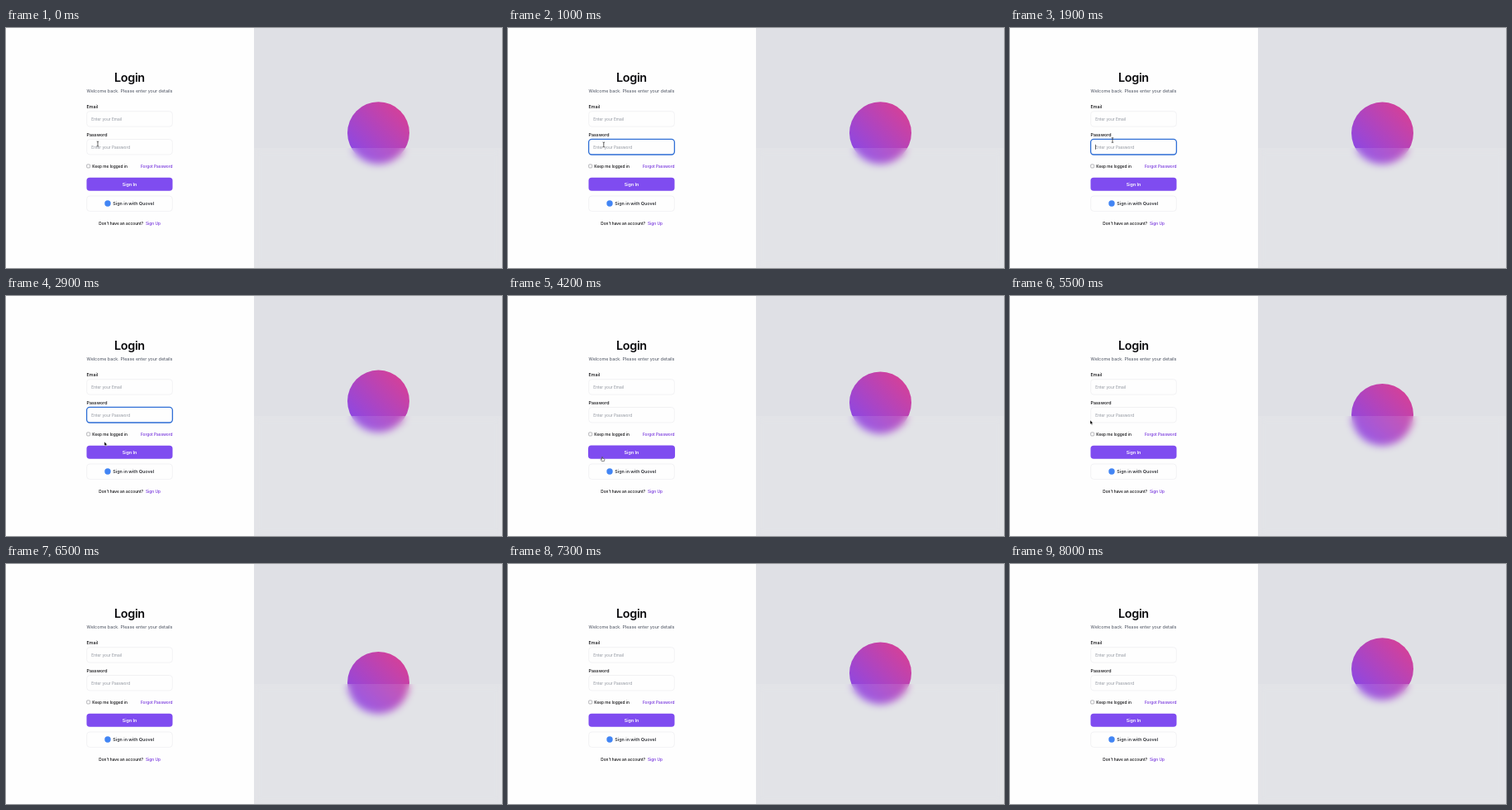
Write an HTML page that moves like this. It is 600 px wide and 290 px high and loops after 8100 ms.

```html
<!DOCTYPE html>
<html lang="en">
<head>
<meta charset="utf-8">
<title>Login</title>
<style>
  html, body { margin: 0; width: 100%; height: 100%; overflow: hidden; }
  body { position: relative; background: #fefefe; }
  .side { position: absolute; left: 300px; top: 0; width: 300px; height: 290px; background: #dfe0e5; }
  .ball {
    position: absolute; left: 112.5px; top: 0; width: 75px; height: 75px; border-radius: 50%;
    background: linear-gradient(to top right, #8049f0, #e03f8c);
  }
  .glass {
    position: absolute; left: 0; top: 145px; width: 300px; height: 145px;
    background: rgba(255, 255, 255, .1); backdrop-filter: blur(5px);
  }
  svg { position: absolute; left: 0; top: 0; }
  text { font: 500 4.8px Inter, "Liberation Sans", sans-serif; fill: #0b0b0e; }
  .title { font-size: 14.4px; font-weight: 600; letter-spacing: -.025em; }
  .intro { font-size: 5.41px; font-weight: 400; fill: #4b5260; }
  .label { font-size: 5.3px; }
  .button { font-size: 5.4px; font-weight: 600; }
  .hint { font-weight: 400; fill: #8f949e; }
  .link { fill: #7431dc; }
  .mid { text-anchor: middle; }
  .box { fill: #fefefe; stroke: #e9e9ed; stroke-width: .6; }
</style>
</head>
<body>
<div class="side">
  <div class="ball" id="ball"></div>
  <div class="glass"></div>
</div>
<svg width="600" height="290" viewBox="0 0 600 290">
  <text class="title mid" x="149.4" y="65.2">Login</text>
  <text class="intro mid" x="149.5" y="78">Welcome back. Please enter your details</text>

  <text class="label" x="97.6" y="96.8">Email</text>
  <rect class="box" x="97.7" y="100.7" width="103.6" height="18.4" rx="3.6"/>
  <text class="hint" x="103.3" y="111.8">Enter your Email</text>

  <text class="label" x="97.6" y="130.6">Password</text>
  <rect class="box" x="97.7" y="134.5" width="103.6" height="18.4" rx="3.6"/>
  <text class="hint" x="103.3" y="145.5">Enter your Password</text>
  <rect id="ring" x="97.6" y="134.4" width="103.8" height="18.6" rx="3.7" fill="none" stroke="#2f6fd6" stroke-width="1.3"/>
  <rect id="caret" x="103.2" y="140.8" width=".6" height="6" fill="#111"/>

  <rect x="97.7" y="164.9" width="4" height="4" rx=".8" fill="#fff" stroke="#6f6f74" stroke-width=".5"/>
  <text x="104.3" y="168.8">Keep me logged in</text>
  <text class="link" x="201.5" y="168.8" text-anchor="end">Forgot Password</text>

  <g id="submit">
    <rect x="97.5" y="180.7" width="104" height="16" rx="3.75" fill="#7f4cf0"/>
    <text class="button mid" x="149.5" y="190.6" style="fill:#fff">Sign In</text>
  </g>

  <rect class="box" x="97.7" y="203" width="103.6" height="18.4" rx="3.6"/>
  <circle cx="123" cy="212" r="3.7" fill="#4285f4"/>
  <text class="button" x="129.3" y="213.8" style="fill:#34363c">Sign in with Quovel</text>

  <text x="112.2" y="237.6">Don't have an account?</text>
  <text class="link" x="169" y="237.6">Sign Up</text>

  <g id="cursor">
    <path id="beam" d="M-1.2 -3Q0 -3 0 -2.2Q0 -3 1.2 -3M0 -2.2V2.2M-1.2 3Q0 3 0 2.2Q0 3 1.2 3" fill="none" stroke="#222" stroke-width=".7"/>
    <path id="arrow" d="M0 0V5L1.1 4L1.9 5.8L2.8 5.4L2 3.7H3.5Z" fill="#000" stroke="#fff" stroke-width=".4"/>
    <path id="hand" d="M-.5 .2Q0 -.4 .5 .2V1.8L2.5 2.3Q3 2.5 2.9 3.2L2.4 5H-.7L-2 3Q-1.7 2.2 -.5 3Z" fill="#fff" stroke="#111" stroke-width=".5"/>
  </g>
</svg>
<script>
  const LOOP = 8100, STEP = 100;
  const REST = 108, RISE = 18.75, PHASE = 0.015;
  const FOCUS = 480, BLUR = 3500, BLINK = 480;
  const EXIT = 6250;
  // Pointer path: time, x, y
  const PATH = [
    [0, 111, 140], [500, 111, 141], [1300, 118, 141], [1900, 124, 135.5], [2400, 124, 160],
    [2900, 119, 176], [3450, 84, 172], [3700, 84, 174], [4200, 114, 194.5],
    [4500, 115, 192], [5100, 92, 165], [5500, 97, 150], [5900, 78, 110], [6250, 71, 73]
  ];
  const el = id => document.getElementById(id);
  const show = (id, on) => el(id).setAttribute("visibility", on ? "visible" : "hidden");
  const smooth = k => k * k * (3 - 2 * k);

  function bezier(x1, y1, x2, y2, x) {
    const at = (a, b, s) => 3 * (1 - s) ** 2 * s * a + 3 * (1 - s) * s * s * b + s ** 3;
    let lo = 0, hi = 1;
    for (let i = 0; i < 30; i++) {
      const s = (lo + hi) / 2;
      if (at(x1, x2, s) < x) lo = s; else hi = s;
    }
    return at(y1, y2, lo);
  }

  function ballTop(t) {
    const p = (t / 1000 + PHASE) % 1;
    const lift = p < 0.5
      ? 1 - bezier(0.8, 0, 1, 1, p * 2)
      : bezier(0, 0, 0.2, 1, p * 2 - 1);
    return REST - RISE * lift;
  }

  function pointer(t) {
    const i = PATH.findIndex(p => p[0] > t);
    if (i < 0) return PATH[PATH.length - 1].slice(1);
    const [t0, x0, y0] = PATH[i - 1], [t1, x1, y1] = PATH[i];
    const k = smooth((t - t0) / (t1 - t0));
    return [x0 + (x1 - x0) * k, y0 + (y1 - y0) * k];
  }

  function draw(t) {
    el("ball").style.transform = `translateY(${ballTop(t)}px)`;

    const [x, y] = pointer(t);
    const visible = t < EXIT;
    const within = (top, bottom) => x > 97.5 && x < 201.5 && y > top && y < bottom;
    const typing = within(100.5, 119.2) || within(134.3, 153);
    const pressing = within(180.7, 196.7);
    el("cursor").setAttribute("transform", `translate(${x} ${y})`);
    show("beam", visible && typing);
    show("hand", visible && pressing);
    show("arrow", visible && !typing && !pressing);

    const scale = pressing ? 1.01 : 1;
    el("submit").setAttribute("transform",
      `translate(149.5 188.7) scale(${scale}) translate(-149.5 -188.7)`);

    const focused = t >= FOCUS && t < BLUR;
    show("ring", focused);
    show("caret", focused && (t - FOCUS) % (2 * BLINK) < BLINK);
  }

  function tick() {
    const t = performance.now() % LOOP;
    draw(Math.floor(t / STEP) * STEP);
    requestAnimationFrame(tick);
  }
  tick();
</script>
</body>
</html>
```
